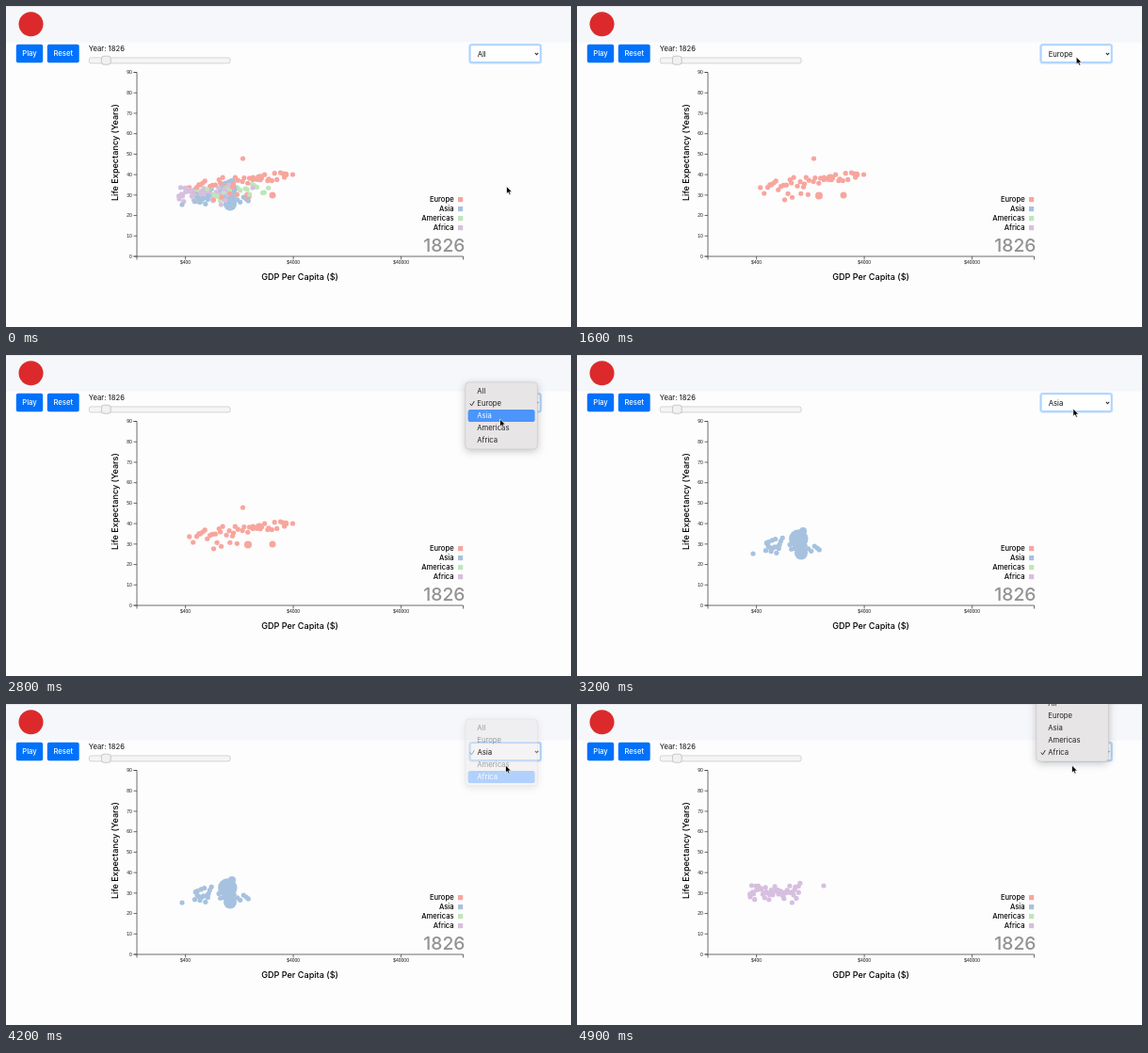
An HTML page for the animation above (5000 ms loop, 600x341 px).

```html
<!DOCTYPE html>
<html lang="en">
<head>
<meta charset="utf-8">
<title>Life expectancy chart</title>
<style>
  html, body { margin: 0; width: 100%; height: 100%; overflow: hidden; background: #fdfdfe; }
  svg { display: block; width: 600px; height: 341px; font: 7.7px Inter, sans-serif; fill: #111; }
  .btn { fill: #0071fb; }
  .btn-text { fill: #fff; font-weight: 500; text-anchor: middle; }
  .tick { font: 5px "Liberation Sans", sans-serif; }
  .title { font-size: 9.1px; font-weight: 500; fill: #000; text-anchor: middle; }
  .key { font-size: 7.6px; font-weight: 500; fill: #000; }
  .year { font-size: 19.3px; font-weight: 500; fill: #929292; text-anchor: end; }
  .line { fill: none; stroke: #484848; stroke-width: .8; }
  .panel { fill: #e8e5e6; stroke: #c6c4c5; stroke-width: .6; filter: drop-shadow(0 2px 4px rgba(0, 0, 0, .22)); }
  .check { fill: none; stroke: #222; stroke-width: .9; stroke-linecap: round; stroke-linejoin: round; }
  .end { text-anchor: end; }
  .mid { text-anchor: middle; }
</style>
</head>
<body>
<svg viewBox="0 0 600 341">
  <rect width="600" height="38.5" fill="#f5f7fa"/>
  <rect width="600" height=".8" fill="#e6e7ea"/>
  <circle cx="26.5" cy="19.3" r="13" fill="#dc2a2c"/>

  <rect class="btn" x="10.8" y="40.8" width="28.4" height="19.5" rx="2"/>
  <rect class="btn" x="43.8" y="40.8" width="33.9" height="19.5" rx="2"/>
  <text class="btn-text" x="25" y="53.4">Play</text>
  <text class="btn-text" x="60.8" y="53.4">Reset</text>

  <text x="87.8" y="47.6">Year: 1826</text>
  <rect x="88.3" y="54.9" width="149.8" height="6" rx="2" fill="#f5f5f5" stroke="#b9b9b9" stroke-width=".6"/>
  <rect x="101.4" y="53.2" width="9.8" height="9" rx="2.6" fill="#f1f1f1" stroke="#a9a9a9" stroke-width=".6"/>

  <rect x="492.2" y="40.7" width="76" height="19.8" rx="2.6" fill="none" stroke="#bfdcff" stroke-width="1.8"/>
  <rect x="493.1" y="41.6" width="74.2" height="18" rx="1.8" fill="#fff" stroke="#80bdff" stroke-width=".7"/>
  <text id="choice" x="500.7" y="53.6"></text>
  <path d="M561.8 49.9l1.7 1.7 1.7-1.7" fill="none" stroke="#333" stroke-width="1.1"/>

  <g id="axes"><path class="line" d="M135.5 70.5H139V266H135.5M139 269.5V266H485.5V269.5"/></g>
  <text class="title" x="312" y="290.7">GDP Per Capita ($)</text>
  <text class="title" transform="translate(118.8 155.6) rotate(-90)">Life Expectancy (Years)</text>
  <g id="dots"></g>
  <g id="legend"></g>
  <text class="year" x="487.5" y="261.2">1826</text>

  <g id="menu">
    <rect id="panel" class="panel" x="487.8" width="76.6" height="71" rx="4"/>
    <rect id="bar" x="490.6" width="71" height="13" rx="2.6" fill="#4b95fb"/>
    <path id="check" class="check" d="M493 51.9l1.5 1.9 2.6-4.4"/>
  </g>
  <path id="cursor" d="M0 0V8.1L1.9 6.4 3.2 9.2 4.6 8.6 3.4 5.9H5.9Z" fill="#000" stroke="#fff" stroke-width=".7"/>
</svg>
<script>
const LOOP = 5000, STEP = 100, ROW = 13, SELECT_Y = 51.5;
const names = ['All', 'Europe', 'Asia', 'Americas', 'Africa'];
const colors = { Europe: '#f8a59d', Asia: '#a6c2de', Americas: '#bfe6b8', Africa: '#d6bfdf' };

// clouds of n countries around x, y, reaching dx, dy and tilted by slope
const clouds = [
  { name: 'Europe', n: 38, x: 246, y: 187, dx: 54, dy: 9, slope: -.13 },
  { name: 'Europe', n: 5, x: 231, y: 204, dx: 18, dy: 6, slope: 0 },
  { name: 'Asia', n: 16, x: 209, y: 204, dx: 10, dy: 12, slope: 0 },
  { name: 'Asia', n: 12, x: 242, y: 206, dx: 19, dy: 8, slope: 0 },
  { name: 'Americas', n: 28, x: 240, y: 196, dx: 42, dy: 13, slope: -.15 },
  { name: 'Africa', n: 48, x: 210, y: 200, dx: 29, dy: 12, slope: 0 }
];
const dot = (name, x, y, r = 2.6) => ({ name, x, y, r });
const dots = [
  dot('Asia', 235.3, 195.5, 10.2), dot('Asia', 238, 210.5, 7), dot('Asia', 240, 187, 4),
  dot('Asia', 187, 211), dot('Europe', 269, 182.5, 4), dot('Europe', 257, 201.5, 4),
  dot('Europe', 283, 201, 3.5), dot('Europe', 297, 179, 3.3), dot('Europe', 304.5, 179),
  dot('Europe', 251.5, 162), dot('Africa', 262, 193)
];

// entry checked on opening, entry picked, and when the list opens and closes
const menus = [
  { on: 0, pick: 1, open: 600, close: 1300 },
  { on: 1, pick: 2, open: 2500, close: 3000 },
  { on: 2, pick: 4, open: 3400, close: 4200 },
  { on: 4, open: 4600, close: Infinity }
];
// time, x, y of the pointer
const path = [
  [0, 531.5, 191.5], [400, 525, 49], [1000, 523, 52], [1200, 525, 64], [1700, 531.5, 51.5],
  [2500, 531.5, 51.5], [2800, 524.5, 68], [3400, 528, 51.5], [3600, 531, 70.9],
  [4100, 531, 76], [4200, 530.5, 65], [4600, 527, 52], [4900, 525.5, 65]
];

const $ = id => document.getElementById(id);
function add(parent, tag, attrs, text = '') {
  const el = document.createElementNS(parent.namespaceURI, tag);
  for (const key in attrs) el.setAttribute(key, attrs[key]);
  el.textContent = text;
  return parent.appendChild(el);
}

let seed = 1826;
function random() {
  seed = seed * 16807 % 2147483647;
  return seed / 2147483647;
}
const spread = () => random() + random() - 1;

for (let i = 0; i < 10; i++) {
  const y = 266 - i * 21.72;
  add($('axes'), 'path', { class: 'line', d: `M135.5 ${y}H139` });
  add($('axes'), 'text', { class: 'tick end', x: 133.8, y: y + 1.8 }, i * 10);
}
[400, 4000, 40000].forEach((value, i) => {
  const x = 190.6 + i * 114.5;
  add($('axes'), 'path', { class: 'line', d: `M${x} 266V269.5` });
  add($('axes'), 'text', { class: 'tick mid', x, y: 274 }, '$' + value);
});

names.slice(1).forEach((name, i) => {
  const y = 205.6 + i * 10;
  add($('legend'), 'text', { class: 'key end', x: 475.6, y: y + 2.6 }, name);
  add($('legend'), 'rect', { x: 480, y: y - 2.6, width: 5.2, height: 5.2, fill: colors[name] });
});

for (const c of clouds) {
  for (let i = 0; i < c.n; i++) {
    // even steps across the cloud with a little jitter
    const dx = c.dx * (2 * (i + random()) / c.n - 1) * .95;
    dots.push(dot(c.name, c.x + dx, c.y + c.slope * dx + c.dy * spread()));
  }
}
// continents overlap in a mixed order
for (const d of dots) d.order = random();
dots.sort((a, b) => a.order - b.order);
for (const d of dots) d.el = add($('dots'), 'circle', { cx: d.x, cy: d.y, r: d.r, fill: colors[d.name] });

const labels = names.map(name => add($('menu'), 'text', { x: 500.3 }, name));

function cursorAt(t) {
  const i = path.findIndex(key => key[0] > t);
  if (i < 0) return path[path.length - 1].slice(1);
  const [t0, x0, y0] = path[i - 1], [t1, x1, y1] = path[i];
  const k = (t - t0) / (t1 - t0);
  return [x0 + (x1 - x0) * k, y0 + (y1 - y0) * k];
}

function drawMenu(t, pointerY) {
  const menu = menus.find(m => t >= m.open && t < m.close + STEP);
  const fading = menu && t >= menu.close;
  $('menu').style.opacity = !menu ? 0 : fading ? .42 : 1;
  if (!menu) return;
  const row = fading ? menu.pick : menu.on + Math.floor((pointerY - SELECT_Y) / ROW + .5);
  const top = SELECT_Y - menu.on * ROW;
  $('panel').setAttribute('y', top - 9.5);
  $('bar').setAttribute('y', top + row * ROW - 6.5);
  $('bar').style.opacity = names[row] ? 1 : 0;
  $('check').style.stroke = row === menu.on ? '#fff' : '#222';
  labels.forEach((label, i) => {
    label.setAttribute('y', top + i * ROW + 2.4);
    label.style.fill = i === row ? '#fff' : '#222';
  });
}

function draw(t) {
  const done = menus.filter(m => t >= m.close + STEP);
  const choice = names[done.length ? done[done.length - 1].pick : 0];
  const pointer = cursorAt(t);
  $('choice').textContent = choice;
  for (const d of dots) d.el.style.display = choice === 'All' || choice === d.name ? '' : 'none';
  drawMenu(t, pointer[1]);
  $('cursor').setAttribute('transform', `translate(${pointer})`);
}

function tick() {
  const t = performance.now() % LOOP;
  draw(Math.floor(t / STEP) * STEP);
  requestAnimationFrame(tick);
}
tick();
</script>
</body>
</html>
```
